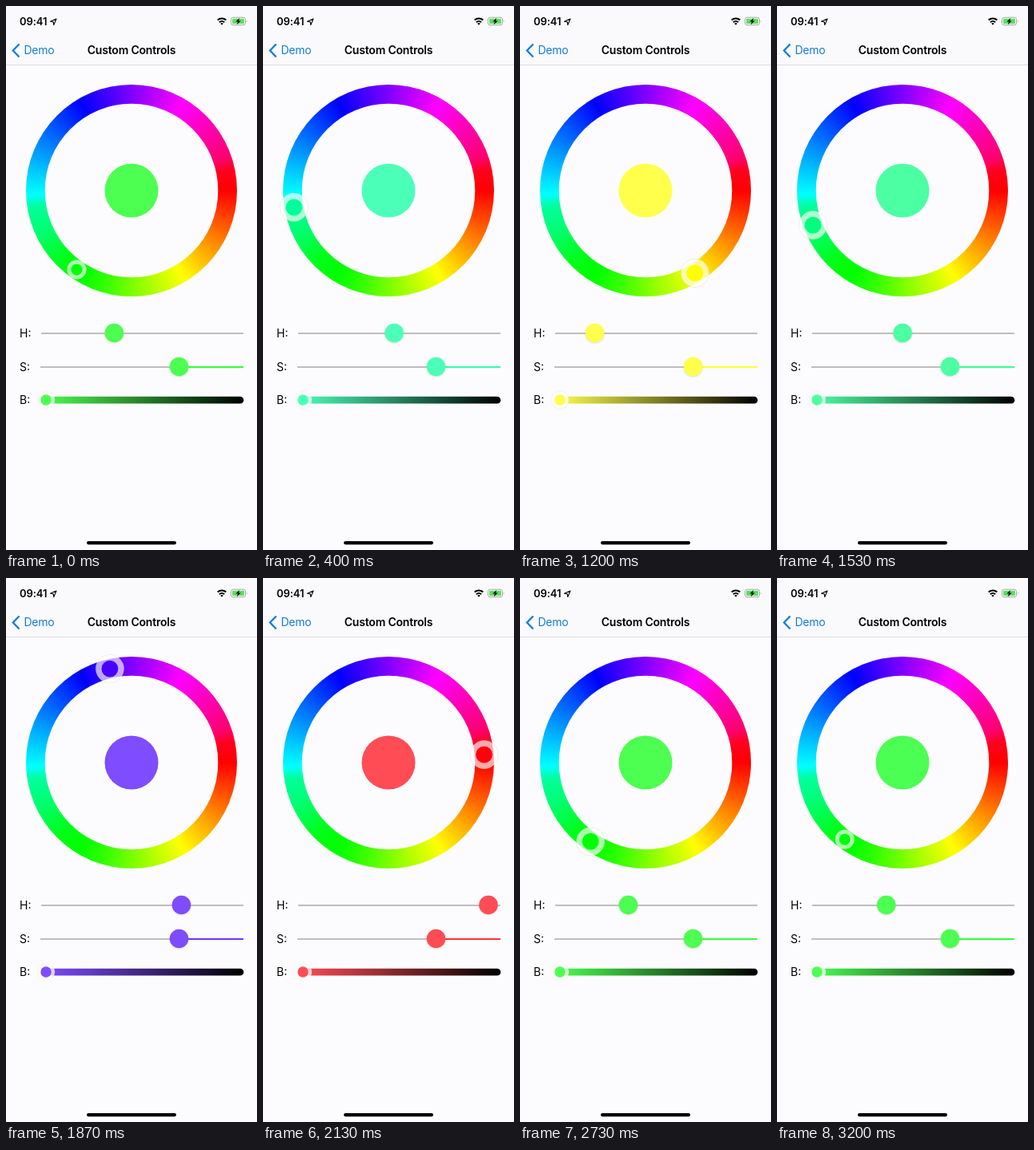
An HTML page that plays this animation: 314 by 678 pixels, repeating every 3270 ms.

```html
<!DOCTYPE html>
<html lang="en">
<head>
<meta charset="utf-8">
<title>Custom Controls</title>
<style>
  html, body { margin: 0; width: 100%; height: 100%; overflow: hidden; background: #fcfcfe; }
  svg { display: block; width: 100%; height: 100%; font: 14px Inter, Roboto, sans-serif; }
  #wheel { width: 264px; height: 264px; border-radius: 50%; }
  .tint { fill: var(--tint); }
  .pure { fill: var(--pure); }
  .thumb { fill: var(--tint); filter: drop-shadow(0 1.5px 1px rgba(120, 110, 40, .22)); }
  .track { stroke: #aeabaa; stroke-width: 1.7; }
  .halo { stroke: #d8cf9a; stroke-opacity: .35; stroke-width: .6; }
  .bold { font-weight: 600; }
</style>
</head>
<body>
<svg id="stage" viewBox="0 0 314 678">
  <defs>
    <linearGradient id="fade">
      <stop offset="0" style="stop-color:var(--tint)"/>
      <stop offset="1"/>
    </linearGradient>
  </defs>

  <!-- status bar -->
  <rect width="314" height="73" fill="#fafafd"/>
  <path d="M0 73.5H314" stroke="#dedee2"/>
  <text class="bold" x="17" y="24" font-size="13" letter-spacing="-.1">09:41</text>
  <path d="M55.5 19.3 63 16 59.8 23.6 59.2 19.9Z" fill="none" stroke="#000" stroke-width="1.1" stroke-linejoin="round"/>
  <g fill="none" stroke="#000" stroke-width="2.1">
    <path d="M264.7 17.6A7.6 7.6 0 0 1 275.3 17.6M266.9 20.2A4.5 4.5 0 0 1 273.1 20.2"/>
  </g>
  <path d="M268.2 21.8Q270 20.4 271.8 21.8L270 23.8Z"/>
  <rect x="281.5" y="14.2" width="18" height="9.6" rx="2.6" fill="#fff" stroke="#9a9d9a" stroke-width=".9"/>
  <rect x="283" y="15.7" width="15" height="6.6" rx="1.3" fill="#5be05f"/>
  <path d="M300.8 17.4Q302.6 19 300.8 20.6Z" fill="#9a9d9a"/>
  <path d="M292.2 14.9 287.3 19.6H290L288.8 23.2 293.7 18.4H291Z"/>

  <!-- navigation bar -->
  <path d="M16.5 47.5 8.8 55.5 16.5 63.5" fill="none" stroke="#147cd6" stroke-width="2.3"/>
  <text x="22.5" y="60" fill="#147cd6" letter-spacing="-.25">Demo</text>
  <text class="bold" x="157" y="60" text-anchor="middle" letter-spacing="-.2">Custom Controls</text>

  <!-- hue wheel -->
  <foreignObject x="25" y="98" width="264" height="264"><div id="wheel"></div></foreignObject>
  <circle cx="157" cy="230" r="108.3" fill="#fcfcfe"/>
  <circle class="tint" cx="157" cy="230" r="33.5"/>
  <g id="knob">
    <circle class="halo" r="12" fill="#fff" fill-opacity=".66"/>
    <circle class="pure" r="7.1"/>
  </g>

  <!-- sliders -->
  <text x="17" y="413">H:</text>
  <text x="17" y="455">S:</text>
  <text x="17" y="496">B:</text>
  <path class="track" d="M44 408H297M43 450H216"/>
  <path d="M216 450H297" style="stroke:var(--line)" stroke-width="2"/>
  <circle class="thumb" id="hue" cy="407.5" r="11.8"/>
  <circle class="thumb" cx="216.5" cy="449.5" r="11.8"/>
  <rect x="44" y="486.8" width="253.3" height="8.8" rx="4.4" fill="url(#fade)"/>
  <circle class="halo" cx="50" cy="491" r="11" fill="#fff" fill-opacity=".75"/>
  <circle class="tint" cx="50" cy="491" r="6.7"/>

  <rect x="101" y="667" width="112" height="4.2" rx="2.1"/>
</svg>
<script>
const LOOP = 3270, FRAME = 200 / 3, LAST = 48;
const byId = id => document.getElementById(id);
const clamp = x => Math.min(1, Math.max(0, x));
const smooth = x => (x = clamp(x)) * x * (3 - 2 * x);

// time in ms, wheel angle in degrees
const path = [[70, 124.8], [400, 170], [870, 299.3], [1200, 419], [1870, 618], [2400, 796.4], [2800, 847]];
const rate = i => (path[i + 1][1] - path[i][1]) / (path[i + 1][0] - path[i][0]);
const slopes = path.map((p, i) => {
  if (!i || i === path.length - 1) return 0;
  const a = rate(i - 1), b = rate(i);
  return 2 * a * b / (a + b);
});

function angleAt(t) {
  if (t <= path[0][0]) return path[0][1];
  const i = path.findIndex(p => p[0] > t) - 1;
  if (i < 0) return path[path.length - 1][1];
  const [t0, a] = path[i], [t1, b] = path[i + 1];
  const h = t1 - t0, u = (t - t0) / h, v = 1 - u;
  return a * v * v * (1 + 2 * u) + b * u * u * (3 - 2 * u)
    + h * u * v * (slopes[i] * v - slopes[i + 1] * u);
}

// wheel angle to displayed hue: uneven bands around green, mint and pink
const bands = [[0, 0], [108, 110], [120, 119], [135, 126], [155, 146], [171, 157],
  [177, 179], [240, 240], [300, 300], [341, 334], [348, 353], [360, 360]];
function shade(angle) {
  const i = Math.max(1, bands.findIndex(b => b[0] >= angle));
  const [x0, y0] = bands[i - 1], [x1, y1] = bands[i];
  return y0 + (y1 - y0) * (angle - x0) / (x1 - x0);
}

// full-brightness colour with the given saturation
const colour = (hue, sat) => `hsl(${hue} 100% ${100 - 50 * sat}%)`;

const stops = Array.from({ length: 181 }, (_, i) => colour(shade(i * 2), 1) + ` ${i * 2}deg`);
byId('wheel').style.background = `conic-gradient(from 90deg, ${stops})`;

const stage = byId('stage'), knob = byId('knob'), hueThumb = byId('hue');

function draw(t) {
  const angle = angleAt(t) % 360, hue = shade(angle), rad = angle * Math.PI / 180;
  const press = smooth((t - 70) / 200) - smooth((t - 2900) / 200);
  const x = 157 + 120 * Math.cos(rad), y = 230 + 120 * Math.sin(rad);
  knob.setAttribute('transform', `translate(${x} ${y}) scale(${1 + .47 * press})`);
  hueThumb.setAttribute('cx', 56 + 229 * angle / 360);
  stage.style.setProperty('--tint', colour(hue, .7));
  stage.style.setProperty('--line', colour(hue, .8));
  stage.style.setProperty('--pure', colour(hue, 1));
}

const start = performance.now();
function tick() {
  const t = (performance.now() - start) % LOOP;
  draw(Math.min(LAST, Math.floor((t + 3.4) / FRAME)) * FRAME);
  requestAnimationFrame(tick);
}
tick();
</script>
</body>
</html>
```
